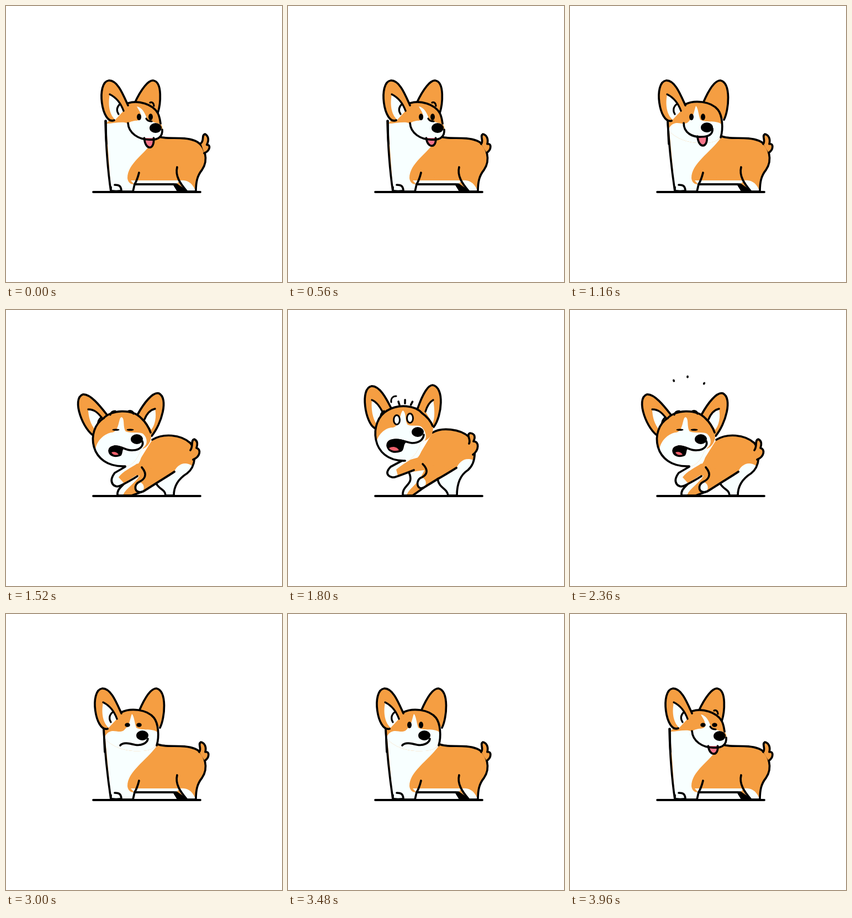
An HTML page with a canvas that plays this animation: 500 by 500 pixels, repeating every 4 s.

```html
<!DOCTYPE html>
<html lang="en">
<head>
<meta charset="utf-8">
<title>Corgi</title>
<style>
html, body { margin: 0; height: 100%; overflow: hidden; background: #fff; }
canvas { display: block; width: 100vw; height: 100vh; }
</style>
</head>
<body>
<canvas id="stage" width="500" height="500"></canvas>
<script>
const ctx = document.getElementById('stage').getContext('2d');
const ORANGE = '#f59e42', WHITE = '#f8ffff', PINK = '#f6748a', BLACK = '#000';

// Pose order: looking right, looking ahead, startled, sneezing, sulking.
// A missing pose falls back to its nearest relative.
const parts = {
  body: [
    'M275,236 C290,243 320,235 342,244 C362,252 367,280 355,297 C346,308 344,320 344,336 L327,336 C318,330 312,325 308,323 L233,323 L230,336 L190,336 C184,295 181,250 180,208',
    'M275,236 C290,243 320,235 342,244 C362,252 367,280 355,297 C346,308 344,320 344,336 L327,336 C318,330 312,325 308,323 L233,323 L230,336 L190,336 C184,295 179,250 177,208',
    'M262,222 C278,212 312,215 328,230 C342,244 342,276 326,290 C310,300 306,318 306,336 L290,336 C288,322 274,324 271,306 L250,319 L226,336 L208,336 C206,316 230,318 219,294',
    'M265,235 C285,223 316,225 334,241 C346,256 344,284 328,296 C312,306 304,320 304,336 L289,336 C288,324 278,326 272,314 L250,328 L228,336 L202,336 C200,322 215,318 222,304'],
  chest: [
    'M181,206 L222,211 L268,243 C252,268 220,285 220,312 C221,320 226,323 232,323 L230,335 L190,335',
    'M178,206 L215,212 L274,238 C252,268 220,285 220,312 C221,320 226,323 232,323 L230,335 L190,335',
    'M200,262 L222,250 L248,232 C243,245 243,258 236,266 C230,270 222,272 218,274 L214,276 L206,272',
    'M206,274 L226,260 L250,246 C246,258 246,270 240,278 C232,282 226,284 222,285 L218,287 L212,284'],
  tail: [
    'M350,250 C355,243 347,236 353,232 C361,234 363,242 361,250 C369,248 369,260 360,266', ,
    'M328,242 C332,234 322,226 330,223 C340,224 339,232 336,238 C347,238 346,254 335,262',
    'M334,254 C340,246 334,236 341,234 C348,237 347,244 345,250 C354,252 352,266 339,271'],
  haunch: [
    'M344,318 C344,325 344,330 344,335 C344,335 344,335 344,335 L327,335 C322,332 316,326 312,316 L316,316 C325,315 336,318 342,332', ,
    'M336,272 C335,280 331,286 326,290 C310,300 306,318 306,336 L290,336 C288,322 274,324 271,306 L305,287 C310,275 320,266 336,272',
    'M337,282 C335,288 332,293 328,296 C312,306 304,320 304,336 L289,336 C288,324 278,326 272,314 L304,295 C308,282 322,272 337,282'],
  thigh: [
    'M310,292 C306,308 316,322 327,335', ,
    'M305,286 C294,293 283,300 271,306',
    'M305,293 C295,300 283,307 272,314'],
  nearLeg: [
    'M241,302 C239,310 236,318 233,323 C233,323 233,323 233,323 L304,323', ,
    'M244,279 C255,290 252,298 243,303 C230,306 232,331 249,320 L305,286',
    'M246,285 C258,299 250,307 242,311 C230,316 232,334 248,329 L305,293'],
  nearPaw: [, ,
    'M243,303 C230,306 232,331 247,320 C252,314 250,307 243,303',
    'M242,311 C230,316 232,334 247,329 C252,322 250,315 242,311'],
  farLeg: [, ,
    'M219,294 C230,318 206,316 208,335 L215,335 C220,322 236,316 247,290',
    'M222,304 C215,318 200,322 202,335 L212,335 C218,322 234,314 242,300'],
  paw: [
    'M190,328 L190,334 C190,336 209,336 209,334 C208,326 205,324 197,324', ,
    'M216,268 L186,284 C172,298 186,306 196,302 C208,298 218,294 228,290',
    'M216,284 L197,295 C184,312 196,324 208,318 C218,313 226,309 238,301'],
  arm: [, ,
    'M196,289 C204,282 214,276 222,271 L240,266 L242,288 L199,300',
    'M204,303 C212,292 226,286 238,278 L244,294 L214,314'],
  earR: [
    'M233,176 C245,150 258,134 267,135 C284,138 280,178 275,194',
    'M241,176 C250,155 262,134 273,135 C292,140 288,188 279,206',
    'M235,178 C243,155 253,136 262,136 C284,140 279,192 264,212',
    'M238,190 C250,168 266,148 277,151 C295,160 282,206 264,228'],
  innerR: [, ,
    'M249,184 C252,174 256,167 263,163 C266,180 266,196 262,206',
    'M251,198 C255,188 261,181 270,179 C273,194 270,208 263,217'],
  earL: [
    'M196,207 C173,216 163,138 186,135 C202,134 212,160 221,180',
    'M184,208 C161,214 151,138 174,135 C190,134 200,160 209,180',
    'M157,214 C140,205 130,142 151,138 C166,137 178,160 187,178',
    'M161,229 C140,219 118,161 139,153 C153,151 172,176 183,190'],
  innerL: [
    'M213,190 C208,176 200,166 188,160 C184,180 188,198 198,206',
    'M201,190 C196,176 188,166 176,160 C172,180 176,198 186,206',
    'M172,186 C166,174 160,166 152,163 C150,180 154,198 160,206',
    'M178,202 C168,186 160,180 149,180 C149,195 154,208 162,218'],
  crease: [
    'M206,178 C200,184 200,190 204,196',
    'M193,178 C187,183 186,190 190,196',
    'M174,183 C169,186 167,190 168,196',
    'M173,194 C168,198 166,203 167,208'],
  head: [
    'M221,176 C240,170 266,178 275,194 C279,202 279,208 280,213 C287,222 285,240 262,243 C235,243 222,226 221,213 C212,208 196,213 181,213',
    'M209,178 C225,170 255,172 268,188 C276,198 278,222 273,238 C265,246 255,248 245,248 C215,250 190,240 178,224 C178,218 178,212 178,208',
    'M180,182 C200,170 230,172 243,187 C250,192 258,200 262,210 C266,222 255,238 242,238 C232,264 222,273 212,273 C148,275 146,200 180,182',
    'M177,196 C190,181 228,178 245,196 C252,202 259,213 262,222 C266,234 258,250 245,252 C236,276 226,283 216,283 C150,286 144,216 177,196'],
  headEdge: [
    'M181,208 C181,222 181,236 182,250',
    'M177,208 C178,222 178,236 179,250',
    'M180,182 C146,200 148,275 212,273',
    'M177,196 C144,216 150,286 216,283'],
  face: [
    'M237,182 C247,184 252,194 256,206 C264,212 278,210 281,218 C285,232 278,241 262,243 C240,243 224,232 221,213 C230,204 246,212 245,200 C244,192 240,188 237,182',
    'M228,181 C232,184 233,198 236,206 C246,212 262,206 275,214 C279,230 274,240 262,246 C230,262 190,250 178,224 C190,200 206,222 216,208 C224,202 224,192 228,181',
    'M208,182 C215,186 211,200 217,208 C228,212 238,206 244,214 C251,222 252,234 245,240 C240,300 175,300 160,240 C164,222 180,212 190,213 C204,210 202,187 208,182',
    'M209,194 C216,196 211,212 217,220 C228,224 238,220 248,224 C257,232 257,244 248,250 C240,310 175,310 162,252 C166,232 182,224 190,222 C206,222 203,196 209,194'],
  mouth: [
    'M221,212 C222,230 240,243 262,242 C276,243 284,236 283,224',
    'M206,212 C206,230 222,238 238,237 C252,237 259,232 258,222',
    'M190,236 C202,233 215,240 225,241 C236,241 245,236 246,226',
    'M196,247 C210,246 218,256 230,254 C242,254 250,246 247,238',
    'M207,238 C212,232 222,234 234,237 C245,239 256,234 257,226'],
  shout: [, ,
    'M180,246 C180,232 202,234 212,239 C206,244 210,252 204,255 C194,259 182,257 180,246',
    'M187,255 C188,245 203,246 211,251 C208,255 210,262 206,263 C198,266 188,264 187,255'],
  shoutTongue: [, ,
    'M183,250 C190,246 198,248 201,254 C194,256 186,255 183,250',
    'M191,258 C195,256 201,257 204,262 C198,264 193,262 191,258']
};

// [time, pose]
const keys = [[0, 0], [600, 0], [880, 1], [1360, 1], [1520, 3], [1680, 2], [2080, 2],
  [2320, 3], [2400, 3], [2640, 4], [3720, 4], [3940, 0], [4000, 0]];
const blinks = [740, 3060, 3380, 3900];

let from, to, mixK;
const lerp = (a, b, k) => a + (b - a) * k;
const val = list => lerp(list[from], list[to], mixK);
const clamp = x => Math.max(0, Math.min(1, x));

function setPose(t) {
  const n = keys.findIndex((key, i) => i && t < key[0]);
  const [t0, p0] = keys[n - 1], [t1, p1] = keys[n];
  const x = (t - t0) / (t1 - t0), y = x - 1;
  from = p0;
  to = p1;
  // The startled jump overshoots, the rest eases in and out.
  mixK = p1 === 2 && p0 === 3 ? 1 + 2.7 * y ** 3 + 1.7 * y ** 2 : x * x * (3 - 2 * x);
}

function poseOf(list, p) {
  const order = [[0], [1, 0, 2], [2], [3, 2], [4, 1, 0, 2]][p].concat(2);
  return list[order.find(i => list[i])];
}

function shape(name) {
  const a = poseOf(parts[name], from), b = poseOf(parts[name], to).match(/\d+/g);
  let i = 0;
  return a.replace(/\d+/g, n => lerp(+n, +b[i++], mixK).toFixed(2));
}

function fill(path, color) {
  ctx.fillStyle = color;
  ctx.fill(new Path2D(path));
}

function stroke(path, width = 3.7) {
  ctx.lineWidth = width;
  ctx.strokeStyle = BLACK;
  ctx.stroke(new Path2D(path));
}

function both(path, color) {
  fill(path, color);
  stroke(path);
}

const firstCurves = (path, n) => path.split('C').slice(0, n + 1).join('C');

function oval(x, y, rx, ry, color) {
  ctx.beginPath();
  ctx.ellipse(x, y, rx, ry, 0, 0, 7);
  ctx.fillStyle = color;
  ctx.fill();
}

function inner(name) {
  const path = shape(name);
  fill(path, WHITE);
  stroke(firstCurves(path, 1), 3.4);
}

function leftEar() {
  both(shape('earL'), ORANGE);
  inner('innerL');
  stroke(shape('crease'), 3.2);
}

function drawTail(t) {
  let angle = 0;
  if (t < 560) angle = 7 + 7 * Math.cos(2 * Math.PI * t / 373);
  else if (t < 1160) angle = 7 - 7 * Math.cos(2 * Math.PI * (t - 560) / 300);
  ctx.save();
  ctx.translate(357, 262);
  ctx.rotate(angle * Math.PI / 180);
  ctx.translate(-357, -262);
  both(shape('tail'), ORANGE);
  ctx.restore();
}

function drawBody(t, crouched) {
  const body = shape('body');
  if (!crouched) {
    fill('M302,323 L318,323 L328,336 L310,336', BLACK);
    both('M208,326 C213,327 215,331 215,336 L208,336', PINK);
  }
  fill(body, ORANGE);
  fill(shape('chest'), WHITE);
  if (crouched) fill(shape('farLeg'), WHITE);
  fill(shape('nearLeg'), ORANGE);
  if (crouched) fill(shape('nearPaw'), WHITE);
  else fill('M226,316 L316,316 L308,323 L232,323', WHITE);
  fill(shape('haunch'), WHITE);
  stroke(body);
  stroke(shape('thigh'));
  const paw = shape('paw');
  fill(paw, WHITE);
  if (crouched) fill(shape('arm'), ORANGE);
  stroke(paw);
  stroke(shape('nearLeg'));
  drawTail(t);
}

function drawTongue(t) {
  const size = val([1, 1, 0, 0, 0]);
  if (size < 0.1) return;
  const bob = t < 1360 ? 2 + 2 * Math.cos(2 * Math.PI * t / 373) : 0;
  const x = val([259.5, 240, 225, 230, 240]), y = val([239, 236, 240, 253, 236]);
  const low = y + (18 + bob) * size;
  both(`M${x - 9},${y} C${x - 8},${low} ${x + 10},${low + 2} ${x + 8},${y}`, PINK);
}

function drawEyes(t) {
  const open = Math.min(1, ...blinks.map(b => Math.abs(t - b) / 95));
  const rx = val([4, 4, 5.5, 6.5, 4]) + (1 - open) * 2;
  const ry = Math.max(1.4, val([6, 6, 8.5, 1.8, 6]) * open);
  const wide = val([0, 0, 1, 0, 0]) > 0.5;
  const spots = [
    [val([241, 220, 197, 199, 220]), val([201, 201, 199, 217, 201])],
    [val([262, 241, 221, 225, 241]), val([201, 201, 196, 217, 201])]];
  for (const [x, y] of spots) {
    oval(x, y, rx, ry, wide ? WHITE : BLACK);
    if (wide) {
      ctx.lineWidth = 3;
      ctx.stroke();
    }
  }
}

function drawHead(t, crouched) {
  const head = shape('head'), ahead = val([0, 1, 1, 1, 1]) > 0.5;
  both(shape('earR'), ORANGE);
  if (crouched) {
    inner('innerR');
    leftEar();
  }
  fill(head, ORANGE);
  ctx.save();
  ctx.clip(new Path2D(head));
  fill(shape('face'), WHITE);
  ctx.restore();
  if (!ahead) stroke('M261,175 C265,173 268,177 268,181', 3.2);
  stroke(firstCurves(head, 2));
  stroke(shape('headEdge'));
  if (!crouched) leftEar();
  if (!ahead) stroke('M254,204 C256,208 260,209 264,209', 3.2);
  if (crouched) {
    both(shape('shout'), BLACK);
    fill(shape('shoutTongue'), '#f0606c');
  }
  drawTongue(t);
  stroke(shape('mouth'));
  oval(val([271, 248, 235, 237, 247]), val([221, 220, 221, 234, 220]), 11, 9, BLACK);
  drawEyes(t);
  if (val([0, 0, 0, 1, 0]) > 0.6) {
    stroke('M189,190 C190,185 193,183 198,183', 3.2);
    stroke('M222,183 C227,182 230,184 231,188', 3.2);
  }
}

function drawMarks(t) {
  if (t < 1640 || t > 2400) return;
  const u = clamp((t - 1800) / 560), half = lerp(3.2, 0.8, u);
  if (t < 2000) stroke('M187,167 C186,160 190,156 196,156', 3);
  for (const [x0, y0, x1, y1] of [[201, 169, 188, 128], [212, 166, 213, 121], [224, 169, 243, 133]]) {
    const x = lerp(x0, x1, u), y = lerp(y0, y1, u);
    const a = Math.atan2(y1 - y0, x1 - x0), dx = half * Math.cos(a), dy = half * Math.sin(a);
    stroke(`M${x - dx},${y - dy} L${x + dx},${y + dy}`, 3.6);
  }
}

function draw(now) {
  const t = Math.floor(now % 4000 / 40) * 40;
  setPose(t);
  const crouched = val([0, 0, 1, 1, 0]) > 0.5;
  ctx.clearRect(0, 0, 500, 500);
  ctx.lineCap = ctx.lineJoin = 'round';
  ctx.save();
  if (t > 1680 && t < 2280) ctx.translate(Math.sin((t - 1800) * Math.PI / 80), 0);
  drawBody(t, crouched);
  drawHead(t, crouched);
  ctx.restore();
  drawMarks(t);
  stroke('M158,337 L352,337', 3.8);
}

const start = performance.now();
function tick() {
  draw(performance.now() - start);
  requestAnimationFrame(tick);
}
tick();
</script>
</body>
</html>
```
